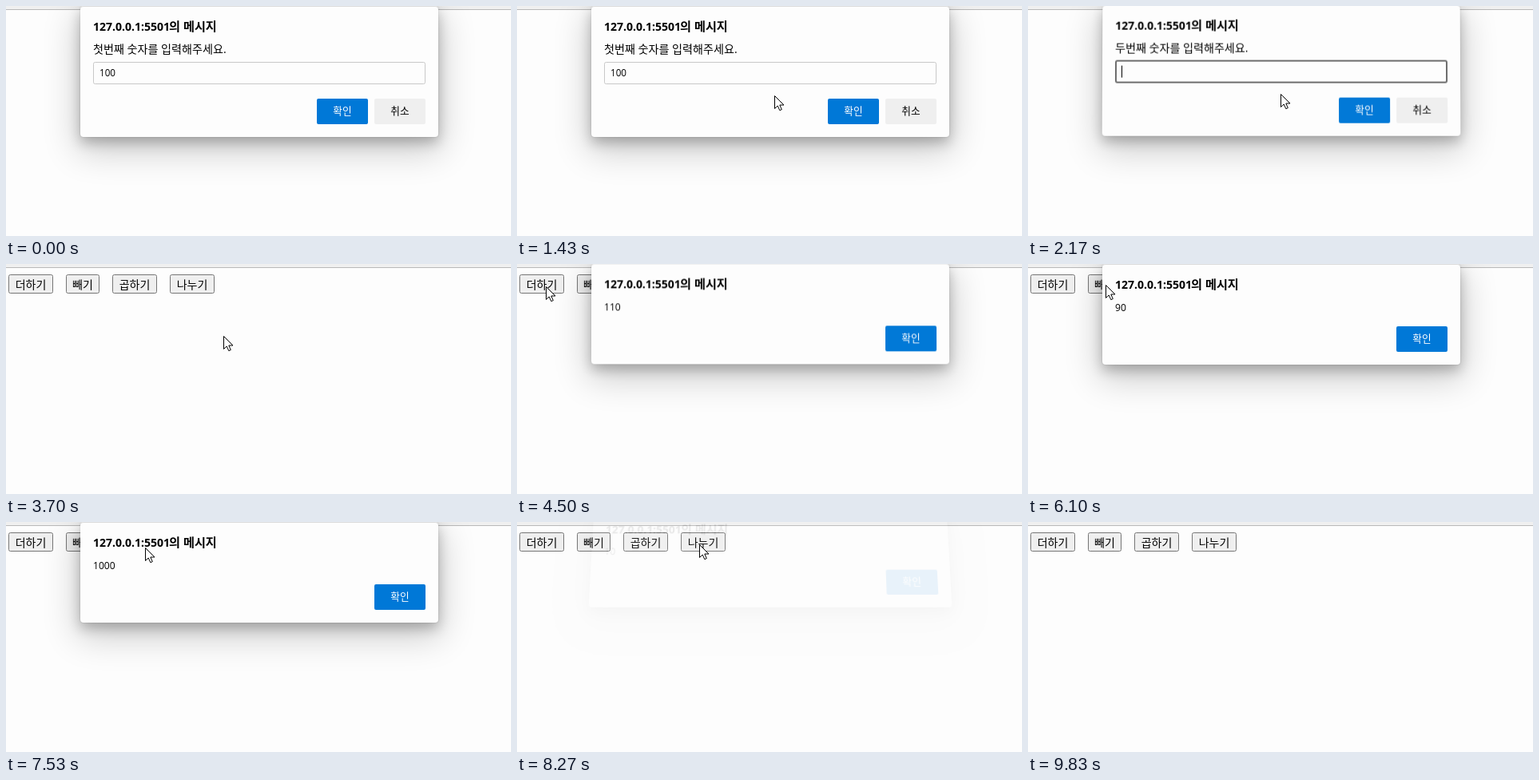
Write an HTML page that moves like this. It is 632x288 px and loops after 9.86 s.

```html
<!DOCTYPE html>
<html lang="ko">
<head>
<meta charset="utf-8">
<style>
  html, body { margin: 0; width: 100%; height: 100%; overflow: hidden; background: #fdfdfd; }
  body { position: relative; }
  svg { position: absolute; left: 0; top: 0; display: block; }
  text { font-family: "Open Sans", "Noto Sans CJK KR", "Noto Sans CJK", sans-serif; fill: #000; }
  #dialog {
    position: absolute; left: 93px; top: 0; width: 448px;
    background: #fdfdfd; border-radius: 4px;
    box-shadow: inset 0 1px #dcdcdc, 0 0 2px rgba(0, 0, 0, .2),
      0 7px 16px rgba(0, 0, 0, .24), 0 14px 44px 4px rgba(0, 0, 0, .2);
  }
  .mid { text-anchor: middle; }
</style>
</head>
<body>
<svg width="632" height="288">
  <rect width="632" height="4" fill="#f0f0f0"/>
  <rect y="4" width="632" height="1" fill="#b9b9b9"/>
  <g id="buttons"></g>
</svg>
<div id="dialog"></div>
<svg width="632" height="288">
  <path id="mouse" d="M.5 .5V16.5L4.2 13 6.8 18.7 9.3 17.6 6.8 12H12Z" fill="#fff" stroke="#000"/>
</svg>
<script>
const LOOP = 9860, OPEN_MS = 250, CLOSE_MS = 150, BUTTONS_AT = 3600;
const $ = id => document.getElementById(id);

// label, x, width, start and end of keyboard focus
const buttons = [
  ['더하기', 3, 56, 5295, 5580],
  ['빼기', 75, 42, 6420, 6940],
  ['곱하기', 133, 56, 7920, 8240],
  ['나누기', 205, 56, 0, 0]
];

const dialogs = [
  { from: -1000, to: 1700, message: '첫번째 숫자를 입력해주세요.', value: () => '100' },
  { from: 2023, to: 3440, message: '두번째 숫자를 입력해주세요.', focus: true,
    value: t => '10'.slice(0, (t > 2700) + (t > 2900)) },
  { from: 4330, to: 5295, message: '110' },
  { from: 5600, to: 6420, message: '90' },
  { from: 6960, to: 7920, message: '1000' },
  { from: 8260, to: 8830, message: '10' }
];

// time, x, y
const path = [
  [60, 430, 190], [600, 330, 120], [1200, 322, 112], [1430, 322, 112], [1700, 316, 110],
  [3430, 316, 110], [3700, 272, 90], [3870, 272, 90], [4260, 36, 28], [4700, 36, 28],
  [5200, 108, 28], [5370, 111, 28], [5560, 111, 28], [5850, 97, 26], [6500, 97, 26],
  [6880, 165, 30], [7530, 174, 32], [7900, 174, 32], [8200, 228, 28], [8860, 228, 28],
  [9500, 240, -24]
];

const clamp = v => Math.max(0, Math.min(1, v));
const rect = (x, y, w, h, fill, stroke = 'none', line = 1, r = 2) =>
  `<rect x="${x}" y="${y}" width="${w}" height="${h}" rx="${r}" fill="${fill}" stroke="${stroke}" stroke-width="${line}"/>`;
const text = (x, y, size, str, attrs = '') =>
  `<text x="${x}" y="${y}" font-size="${size}" ${attrs}>${str}</text>`;

function mouseAt(t) {
  const i = path.findIndex(p => p[0] > t);
  if (i === 0) return path[0].slice(1);
  if (i < 0) return path[path.length - 1].slice(1);
  const [t0, x0, y0] = path[i - 1], [t1, x1, y1] = path[i];
  const u = (t - t0) / (t1 - t0), e = u * u * (3 - 2 * u);
  return [x0 + (x1 - x0) * e, y0 + (y1 - y0) * e];
}

function inputField(d, t) {
  const value = d.value(t);
  let out = d.focus
    ? rect(110, 70, 414, 27, '#fdfdfd', '#6c6c6c', 2)
    : rect(109.5, 70.5, 415, 27, '#fdfdfd', '#c8c8c8');
  out += text(117, 88, 11.7, value);
  if (d.focus && (t - d.from) % 1060 < 530)
    out += rect(117 + value.length * 6.7, 76, 1, 15, '#000', 'none', 0, 0);
  return out;
}

function dialogBody(d, t) {
  const prompt = !!d.value, height = prompt ? 164 : 126;
  const top = height - 48, okX = prompt ? 389 : 461;
  return `<svg width="448" height="${height}" viewBox="93 0 448 ${height}">`
    + text(109, 31, 14, '127.0.0.1:5501', 'font-weight="700"')
    + text(204, 31, 15.2, '의 메시지', 'font-weight="700"')
    + text(109, 59, prompt ? 14.1 : 12.1, d.message)
    + (prompt ? inputField(d, t) + rect(461, top, 64, 32, '#efefef')
      + text(493, top + 20, 12.7, '취소', 'class="mid"') : '')
    + rect(okX, top, 64, 32, '#0078d7')
    + text(okX + 32, top + 20, 12.7, '확인', 'class="mid" style="fill:#fff"')
    + '</svg>';
}

function drawDialog(t) {
  const box = $('dialog');
  const d = dialogs.find(d => t >= d.from && t < d.to + CLOSE_MS);
  box.style.display = d ? 'block' : 'none';
  if (!d) return;
  // 0 when at rest, 1 when fully gone
  const away = t < d.to
    ? (1 - clamp((t - d.from) / OPEN_MS)) ** 3
    : clamp((t - d.to) / CLOSE_MS);
  box.style.height = (d.value ? 164 : 126) + 'px';
  box.style.opacity = 1 - 1.2 * away * away;
  box.style.transform = away
    ? `perspective(1000px) translateY(${-20.5 * away}px) rotateX(${16 * away}deg)` : 'none';
  box.innerHTML = dialogBody(d, t);
}

function drawButtons(t, [mx, my]) {
  const blocked = dialogs.some(d => t >= d.from && t < d.to);
  $('buttons').innerHTML = t < BUTTONS_AT ? '' : buttons.map(([label, x, w, on, off]) => {
    const hover = !blocked && mx >= x && mx < x + w && my >= 13 && my < 37;
    const dark = hover || (t >= on && t < off);
    return rect(x + .5, 13.5, w - 1, 23, hover ? '#dedede' : '#efefef', dark ? '#303030' : '#767676')
      + text(x + w / 2, 30.5, 14, label, 'class="mid"');
  }).join('');
}

function frame(now) {
  const t = now % LOOP, mouse = mouseAt(t);
  drawButtons(t, mouse);
  drawDialog(t);
  $('mouse').setAttribute('transform', `translate(${mouse.map(Math.round)})`);
  $('mouse').style.display = t < path[0][0] ? 'none' : '';
  requestAnimationFrame(frame);
}
frame(0);
</script>
</body>
</html>
```
